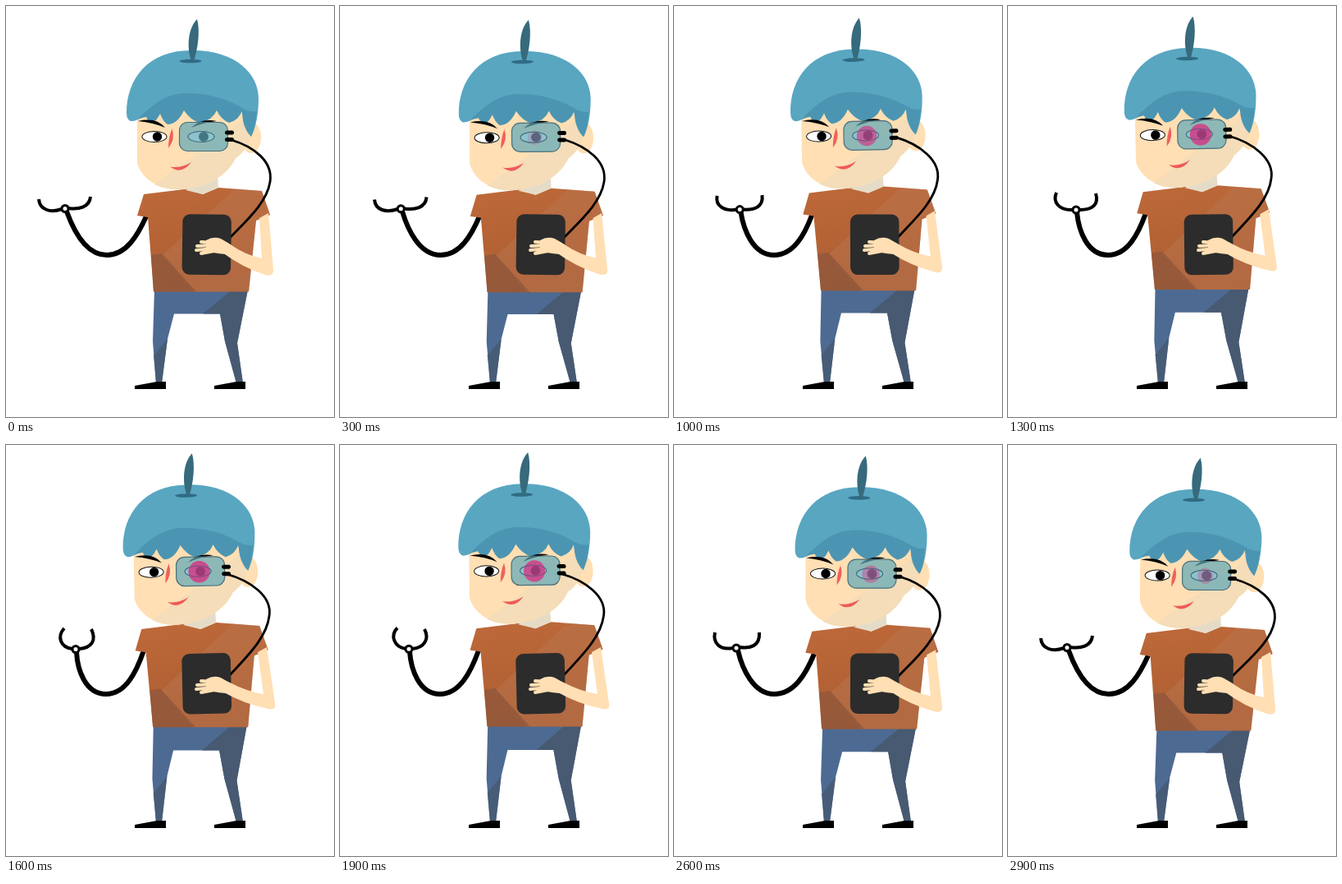
An HTML page without scripts for the animation above (3000 ms loop, 400x500 px).

```html
<!DOCTYPE html>
<html lang="en">
<head>
<meta charset="utf-8">
<title>Listening boy</title>
<style>
@property --lean { syntax: '<number>'; inherits: true; initial-value: 0; }
@property --rise { syntax: '<number>'; inherits: true; initial-value: 0; }
@property --glow { syntax: '<number>'; inherits: true; initial-value: 0; }

html, body { margin: 0; width: 100%; height: 100%; overflow: hidden; background: #fff; }
svg { display: block; width: 100vw; height: 100vh; animation: sway 3s linear infinite; }

.head, .torso { transform-origin: 238px 400px; }
.head {
  transform: translateY(calc(var(--rise) * -1px)) rotate(calc(var(--lean) * 1deg)) scaleY(calc(1 + var(--rise) * .0013));
}
.torso {
  transform: translateY(calc(var(--rise) * -1px)) skewX(calc(var(--lean) * -1deg)) scaleY(calc(1 + var(--rise) * .0013));
}
.legs {
  transform-origin: 238px 460px;
  transform: skewX(calc(var(--lean) * -.65deg)) scaleY(calc(1 + var(--rise) * .0089));
}
.board {
  transform-origin: 244.5px 290.5px;
  transform: rotate(calc(.8deg + var(--lean) * .5deg - var(--rise) * .4deg));
}
.glow { r: calc(8px + var(--glow) * 6px); opacity: var(--glow); }

.line { fill: none; stroke: #000; }
.skin { fill: #ffdfb3; }
.fingers { fill: none; stroke: #ffdfb3; stroke-width: 4; stroke-linecap: round; }
.hose { stroke-width: 6; animation: hose 3s linear infinite; }
.clasp { stroke-width: 4; animation: clasp 3s linear infinite; }
.joint { fill: #fff; stroke: #000; stroke-width: 3; animation: joint 3s linear infinite; }
.cable { stroke-width: 2.8; animation: cable 3s linear infinite; }
.arm { animation: arm 3s linear infinite; }

@keyframes sway {
  0%    { --lean: 0;     --rise: 0;   --glow: 0; }
  10%   { --lean: -.46;  --rise: -.6; --glow: .17; }
  20%   { --lean: -.8;   --rise: -.3; --glow: .4; }
  31%   { --lean: -1.04; --rise: .9;  --glow: .66; }
  43.3% { --lean: -1.1;  --rise: 2.3; --glow: .85; }
  53.3% { --lean: -.92;  --rise: 4;   --glow: .86; }
  63.3% { --lean: -.57;  --rise: 4.7; --glow: .84; }
  73.3% { --lean: -.2;   --rise: 4;   --glow: .74; }
  86.7% { --lean: .12;   --rise: 1.8; --glow: .45; }
  96.7% { --lean: .27;   --rise: .1;  --glow: .3; }
  100%  { --lean: 0;     --rise: 0;   --glow: 0; }
}
@keyframes clasp {
  0%, 96.7%, 100% { d: path('M40 235C41 248 54 252 68 247M76 246C88 248 102 245 103 232'); }
  20%   { d: path('M44 236C45 249 59 252 73 247M81 247C94 249 107 246 108 233'); }
  43.3% { d: path('M59 227C54 238 62 249 79 248M87 248C104 248 111 241 107 228'); }
  53.3% { d: path('M71 223C62 233 66 246 81 248M89 248C104 247 111 238 104 224'); }
  73.3% { d: path('M69 222C60 230 65 245 79 248M87 248C101 246 108 235 102 224'); }
  86.7% { d: path('M50 228C47 241 56 250 72 247M80 246C94 248 105 244 104 228'); }
}
@keyframes joint {
  0%, 96.7%, 100% { cx: 72px; cy: 246.5px; }
  20%   { cx: 76.5px; cy: 247px; }
  43.3% { cx: 83px; cy: 248px; }
  53.3% { cx: 85px; cy: 248.5px; }
  73.3% { cx: 83px; cy: 248px; }
  86.7% { cx: 76px; cy: 247px; }
}
@keyframes hose {
  0%, 96.7%, 100% { d: path('M74 250C82 272 97 303 123 303C147 303 161 278 171 256'); }
  20%   { d: path('M78 250C83 272 97 303 122 303C146 303 160 279 169 256'); }
  43.3% { d: path('M84 251C86 272 96 303 122 303C146 303 159 277 168 252'); }
  53.3% { d: path('M86 252C87 272 96 303 122 303C146 303 159 276 168 250'); }
  73.3% { d: path('M84 251C86 272 96 303 122 303C146 303 160 276 170 250'); }
  86.7% { d: path('M78 250C83 272 97 303 122 303C147 303 161 278 171 254'); }
}
@keyframes cable {
  0%, 100% { d: path('M275 163C302 171 326 189 322 214C318 240 292 262 272 283'); }
  20%   { d: path('M272 162C300 171 326 189 322 214C318 240 292 262 272 283'); }
  43.3% { d: path('M269 158C298 166 325 186 321 210C318 237 292 260 272 282'); }
  53.3% { d: path('M269 157C298 165 325 184 321 208C318 235 292 259 272 281'); }
  73.3% { d: path('M273 157C300 165 326 184 322 208C318 235 292 259 272 281'); }
  86.7% { d: path('M275 160C302 168 328 187 324 212C320 238 292 262 272 283'); }
  96.7% { d: path('M276 163C304 171 329 189 325 214C321 240 292 262 272 283'); }
}
@keyframes arm {
  0%, 96.7%, 100% { d: path('M309 258L320 252L326 320Q327 330 316 327Q288 318 264 300L266 286Q271 288 275 291Q292 303 312 307Z'); }
  20% { d: path('M308 258L318 252L326 319Q328 328 317 326Q288 317 264 300L266 286Q271 288 275 291Q292 302 312 306Z'); }
  50%, 75% { d: path('M307 252L318 246L328 314Q330 323 320 321Q290 315 264 300L266 286Q271 288 275 290Q292 299 314 303Z'); }
}
</style>
</head>
<body>
<svg viewBox="0 0 400 500">
  <defs>
    <linearGradient id="cloth" x2=".2" y2="1">
      <stop stop-color="#be693a"/><stop offset=".5" stop-color="#b56335"/><stop offset="1" stop-color="#ad6036"/>
    </linearGradient>
    <path id="shoe" d="M157 466V462L184 457H195V466Z"/>
  </defs>

  <g class="legs">
    <path fill="#4d6a92" d="M181 345H295L282 410L289 459H281L267 408L261 374.500H205L197 405L190 459H183L179 408Z"/>
    <path fill="#475a72" d="M240 374.500L276 345H295L282 410L289 459H281L267 408L261 374.500Z"/>
    <path fill="#475a72" opacity=".85" d="M197 405L190 459H183L180 425Z"/>
  </g>
  <use href="#shoe"/>
  <use href="#shoe" x="97"/>

  <path class="line hose"/>
  <path class="line clasp"/>
  <circle class="joint" r="4"/>

  <g class="torso">
    <path fill="url(#cloth)" d="M168 229L221 222.500L240 229L259 221L312 225L322 254L305 261L296 347.500H180L173 257L160 255Z"/>
    <path fill="#b87650" opacity=".45" d="M279 222.500L312 225L322 254L305 261L296 347.500H228L190 304Z"/>
    <path fill="#8c563b" opacity=".7" d="M177 303L190 301L232 347.500H180Z"/>
    <path fill="#e5dcc8" d="M219 224L258 203L259 221L240 229Z"/>
  </g>

  <g class="head">
    <ellipse class="skin" cx="299" cy="160" rx="12" ry="19"/>
    <path class="skin" d="M160 130L160 191C166 212 188 224 212 223C246 221 270 206 280 185C292 177 299 165 299 145L290 115H170Z"/>
    <path fill="#f4ddb8" d="M299 132L181 217Q195 224 212 223C246 221 270 206 280 185C292 177 299 165 299 145Z"/>

    <path fill="#59a6c1" d="M147 130C147 88 174 54 225 54C279 53 308 82 308 112C308 133 304 150 299 159L287 128L220 115L170 133Q158 141 152 140Q147 138 147 130Z"/>
    <path fill="#4c95b2" d="M161 137C178 121 195 106 220 106C250 106 273 115 288 124Q298 130 306 128C304 145 302 152 299 159C291 151 288 140 288 127Q284 139 272 142Q262 138 257 127Q252 139 236 142Q225 139 217 127Q209 144 197 144Q191 140 188 131Q183 141 178 142Q173 140 171 135Z"/>
    <ellipse cx="225" cy="67" rx="13.500" ry="2.300" fill="#2f6c84"/>
    <path fill="#366a7c" d="M226 67C220 50 222 27 233 16C237 30 234 52 229 67Z"/>

    <path d="M161 140Q183 135 194 148Q180 142 161 140Z"/>
    <path d="M226 148Q238 136 257 140Q240 142 226 148Z"/>
    <g fill="#fff" stroke="#111">
      <ellipse cx="181" cy="159" rx="15" ry="6.500"/>
      <ellipse cx="238" cy="159" rx="16" ry="6.500"/>
    </g>
    <circle cx="184.500" cy="159" r="5.700"/>
    <circle cx="241" cy="159" r="6"/>
    <path fill="#f0605c" d="M202.500 149Q207 162 198 173Q198 160 202.500 149Z"/>
    <path fill="#ef5a58" d="M200 195.500Q213 198 226 190Q214 206 200 195.500Z"/>

    <rect x="211.500" y="141.500" width="59" height="35" rx="10" fill="#5fa8b8" fill-opacity=".7" stroke="#4a6f7b" stroke-width="1.200"/>
    <circle class="glow" cx="239.500" cy="159.500" fill="#d23a86"/>
    <g fill="none" stroke="#8d2f6c" opacity=".55">
      <ellipse cx="238" cy="159" rx="16" ry="6.500" stroke="#37627c"/>
      <circle cx="241" cy="159" r="5.500" fill="#743064" style="opacity:var(--glow)"/>
    </g>
    <rect x="267" y="151.500" width="11" height="5" rx="2.500"/>
    <rect x="267" y="160" width="11" height="5" rx="2.500"/>
  </g>

  <path class="line cable"/>
  <rect class="board" x="215" y="253.500" width="59.500" height="73.500" rx="9" fill="#2c2c2c"/>
  <path class="skin arm"/>
  <path class="skin" d="M244 285Q256 278 267 286L275 291L268 302Q252 301 244 297Z"/>
  <path class="fingers" d="M254 288L238 287M254 291L233 292M254 295L232 297M254 298L238 301"/>
</svg>
</body>
</html>
```
